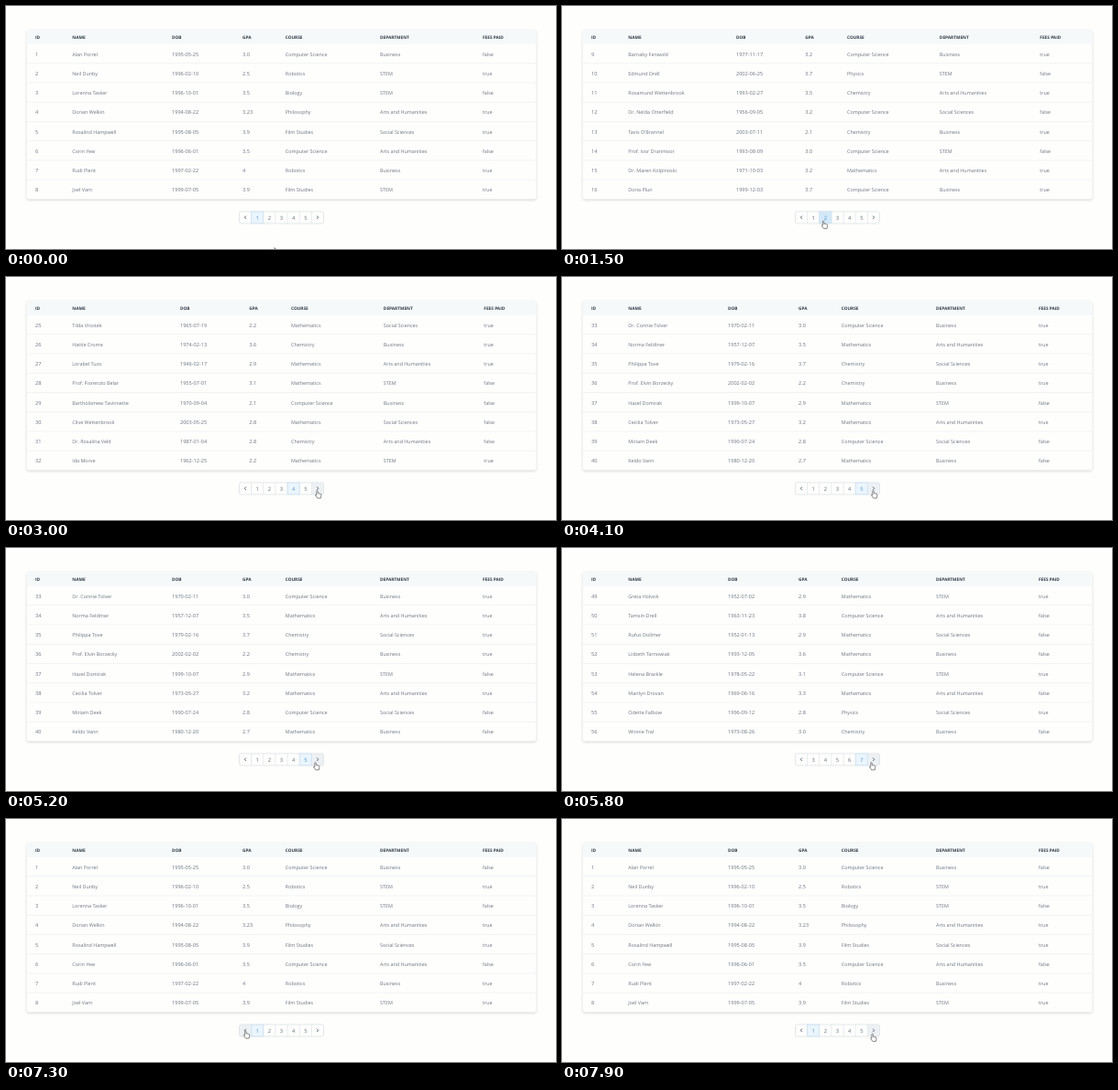
Animation, 600 px wide and 266 px high, one loop 8000 ms. Source, as an HTML page with a canvas:

```html
<!DOCTYPE html>
<html lang="en">
<head>
<meta charset="utf-8">
<title>Paginated student table</title>
<style>
  html, body { margin: 0; width: 100%; height: 100%; overflow: hidden; background: #fefefc; }
  canvas { display: block; width: 600px; height: 266px; }
</style>
</head>
<body>
<canvas id="stage"></canvas>
<script>
const W = 600, H = 266, LOOP = 8000, STEP = 100;
const FONT = '"Open Sans", "Noto Sans", sans-serif';
const HEADS = ['ID', 'NAME', 'DOB', 'GPA', 'COURSE', 'DEPARTMENT', 'FEES PAID'];
const COURSES = { C: 'Computer Science', R: 'Robotics', B: 'Biology', H: 'Philosophy',
  F: 'Film Studies', P: 'Physics', K: 'Chemistry', M: 'Mathematics' };
const DEPTS = { B: 'Business', S: 'STEM', A: 'Arts and Humanities', O: 'Social Sciences' };
const PER_PAGE = 8;

// name | course, department, fees paid | birth date | GPA
// The last two are generated where they are left out.
const STUDENTS = `Alan Porrel|CBf|1995-05-25|3.0
Neil Dunby|RSt|1996-02-10|2.5
Lorenna Tasker|BSf|1996-10-01|3.5
Dorian Welkin|HAt|1994-08-22|3.23
Rosalind Hampwell|FOt|1995-08-05|3.9
Corin Yew|CAf|1996-06-01|3.5
Rudi Plent|RBt|1997-02-22|4
Joel Varn|FSt|1999-07-05|3.9
Barnaby Fenwold|CBt
Edmund Drell|PSf
Rosamund Wettenbrook|KAt
Dr. Nelda Otterfield|COf
Tavis O'Brannel|KBt
Prof. Ivor Dranmoor|CSf
Dr. Maren Kolpinoski|MAt
Doria Plun|CBt
Della Harnwick|MSf
Prof. Osric Tamblin|COt
Minnie Grovall|PBt
Cyrus Pellander|KAf
Dr. Leonora Vastwick|MSt
Hugo Brindlow|CBf
Thora Ellmond|KOt
Gideon Marsk|MAf
Tilda Vrostek|MOt
Hattie Crome|KBt
Lorabel Tuzo|MAt
Prof. Fiorenzio Belar|MSf
Bartholomew Tavinnette|CBf
Clive Wettenbrook|MOf
Dr. Rosalina Veld|KAf
Ida Morve|MSt
Dr. Connie Tolver|CBt
Norma Feldtner|MAt
Philippa Tove|KOt
Prof. Elvin Borzecky|KBt
Hazel Domirak|MSf
Cecilia Tolver|MAt
Miriam Deek|COf
Keldo Vann|MBf
Prof. Wilhelmina Astercott|KSt
Jonas Tredlow|MBf
Adela Brunsky|CAt
Dr. Percy Vanholt|MOf
Elsie Crandow|PSt
Magnus Feller|CBf
Opal Dristan|MAt
Rowan Teskel|KOf
Greta Holvick|MSt
Tamsin Drell|CAf
Rufus Dollmer|MOf
Lisbeth Tarnowiak|MBf
Helena Brackle|CSt
Marilyn Drovan|MAf
Odette Falbow|POt
Winnie Tral|KBf`.split('\n').map(toRow);

function random(seed) {
  const v = Math.sin(seed * 12.9898) * 43758.5453;
  return v - Math.floor(v);
}

function between(lo, hi, seed) {
  return lo + Math.floor(random(seed) * (hi - lo + 1));
}

function birthDate(id) {
  const parts = [between(1946, 2003, id), between(1, 12, id + .3), between(1, 28, id + .6)];
  return parts.map(n => String(n).padStart(2, '0')).join('-');
}

function toRow(line, i) {
  const id = i + 1;
  const [name, codes, dob = birthDate(id), gpa = (between(21, 39, id + .8) / 10).toFixed(1)] = line.split('|');
  const [course, dept, paid] = codes;
  return [id, name, dob, gpa, COURSES[course], DEPTS[dept], String(paid === 't')];
}

// Long names push the columns on their right, the far ones least
const COLS = [32, 72.3, 181, 258, 304.8, 408, 520];
function columnsOf(page) {
  const push = page === 6 ? 18 : page > 1 && page < 5 ? 9 : 0;
  return COLS.map((x, c) => c < 2 ? x : x + push * (580 - x) / 400);
}

const NEXT_CLICKS = [1500, 2200, 2900, 3900, 5300, 5800];
const PREV_START = 6320, PREV_EVERY = 190;

function pageAt(t) {
  const forward = NEXT_CLICKS.filter(click => click <= t).length;
  const back = t < PREV_START ? 0 : Math.floor((t - PREV_START) / PREV_EVERY) + 1;
  return Math.max(1, 1 + forward - back);
}

const MOVES = [
  { at: 750, time: 250, x: 285.2, y: 235 },
  { at: 1550, time: 450, x: 339.5, y: 233.5 },
  { at: 4850, time: 150, x: 337.5, y: 234.3 },
  { at: 5850, time: 350, x: 261.3, y: 231.5 },
  { at: 7850, time: 50, x: 338.6, y: 234.8 }
];

function pointerAt(t) {
  let x = 293, y = 264.6;
  for (const m of MOVES) {
    const left = 1 - Math.min(1, Math.max(0, (t - m.at) / m.time));
    const k = 1 - left ** 4;
    x += (m.x - x) * k;
    y += (m.y - y) * k;
  }
  return { x, y };
}

const TABLE = { x: 22.5, y: 26, w: 556, h: 185.6, head: 15.6, row: 21.25 };
const PAGER = { x: 254.5, y: 225, w: 92, h: 13, cells: 7 };
const CELL = PAGER.w / PAGER.cells;
const HAND = new Path2D('M-.7.8Q0-.4.7.8V3.3L3.4 3.8Q4.6 4.1 4.4 5.6L3.8 8.6H.3L-2 5.4Q-2 4.2-.7 5.2Z');
const ARROW = new Path2D('M0 0V9.2L2.1 7.2 3.6 10.4 5 9.8 3.5 6.7H6.4Z');

const canvas = document.getElementById('stage');
const ctx = canvas.getContext('2d');
const ratio = window.devicePixelRatio || 1;
canvas.width = W * ratio;
canvas.height = H * ratio;

function box(x, y, w, h, fill) {
  ctx.fillStyle = fill;
  ctx.fillRect(x, y, w, h);
}

function label(text, x, y, size, color, weight = 400, align = 'left') {
  ctx.font = `${weight} ${size}px ${FONT}`;
  ctx.textAlign = align;
  ctx.fillStyle = color;
  ctx.fillText(text, x, y);
}

function roundPath({ x, y, w, h }, r) {
  ctx.beginPath();
  ctx.roundRect(x, y, w, h, r);
}

function drawTable(page) {
  const { x, y, w, head, row } = TABLE;
  const cols = columnsOf(page);

  ctx.save();
  ctx.shadowColor = 'rgba(0,0,0,.17)';
  ctx.shadowBlur = 3 * ratio;
  ctx.shadowOffsetY = ratio;
  ctx.fillStyle = '#fefefd';
  roundPath(TABLE, 3);
  ctx.fill();
  ctx.restore();

  ctx.save();
  roundPath(TABLE, 3);
  ctx.clip();
  box(x, y, w, head, '#f6f9f9');
  for (let i = 1; i < PER_PAGE; i++) box(x, y + head + i * row - .5, w, .8, '#eef1f2');
  ctx.restore();

  HEADS.forEach((text, c) => label(text, cols[c], 35.8, 4.75, '#303a48', 700));
  STUDENTS.slice((page - 1) * PER_PAGE, page * PER_PAGE).forEach((cells, r) => cells.forEach((text, c) => {
    const numeric = c === 0 || c === 2 || c === 3;
    label(text, cols[c], 54.6 + r * row, numeric ? 5.6 : 5.4, '#6b737e');
  }));
}

function chevron(x, dir) {
  ctx.beginPath();
  ctx.moveTo(x - dir * .8, 229.7);
  ctx.lineTo(x + dir * .8, 231.4);
  ctx.lineTo(x - dir * .8, 233.1);
  ctx.strokeStyle = '#4a5362';
  ctx.lineWidth = .9;
  ctx.stroke();
}

function drawPager(page, hover) {
  const { x, y, w, h, cells } = PAGER;
  const first = Math.max(1, page - 4), active = page - first + 1;
  const left = i => x + i * CELL;

  ctx.save();
  roundPath(PAGER, 2);
  ctx.clip();
  box(x, y, w, h, '#fefefd');
  if (hover >= 0) box(left(hover), y, CELL, h, '#eef1f4');
  box(left(active), y, CELL, h, hover === active ? '#d3e8f8' : '#eaf5fd');
  for (let i = 1; i < cells; i++) box(left(i) - .4, y, .8, h, '#e2e6ea');
  ctx.restore();

  ctx.lineWidth = .8;
  ctx.strokeStyle = '#dce1e5';
  roundPath(PAGER, 2);
  ctx.stroke();
  ctx.strokeStyle = '#cfe4f4';
  ctx.strokeRect(left(active), y, CELL, h);

  for (let i = 1; i < cells - 1; i++) {
    const color = i === active ? '#4c97d2' : '#66707d';
    label(first + i - 1, left(i + .5), 233.5, 5.8, color, 400, 'center');
  }
  chevron(left(.5), -1);
  chevron(left(cells - .5), 1);
}

function drawPointer({ x, y }, shape) {
  ctx.save();
  ctx.translate(x, y);
  ctx.fillStyle = '#fff';
  ctx.strokeStyle = '#484848';
  ctx.lineWidth = .65;
  ctx.lineJoin = 'round';
  ctx.fill(shape);
  ctx.stroke(shape);
  ctx.restore();
}

function draw(t) {
  const page = pageAt(t), pointer = pointerAt(t);
  const { x, y, w, h } = PAGER;
  const inside = pointer.x > x && pointer.x < x + w && pointer.y > y && pointer.y < y + h;
  const hover = inside ? Math.floor((pointer.x - x) / CELL) : -1;

  ctx.setTransform(ratio, 0, 0, ratio, 0, 0);
  ctx.textRendering = 'geometricPrecision';
  box(0, 0, W, H, '#fefefc');
  drawTable(page);
  drawPager(page, hover);
  drawPointer(pointer, inside ? HAND : ARROW);
}

const start = performance.now();
function tick() {
  const t = (performance.now() - start) % LOOP;
  draw(Math.floor(t / STEP) * STEP);
  requestAnimationFrame(tick);
}
tick();
</script>
</body>
</html>
```
